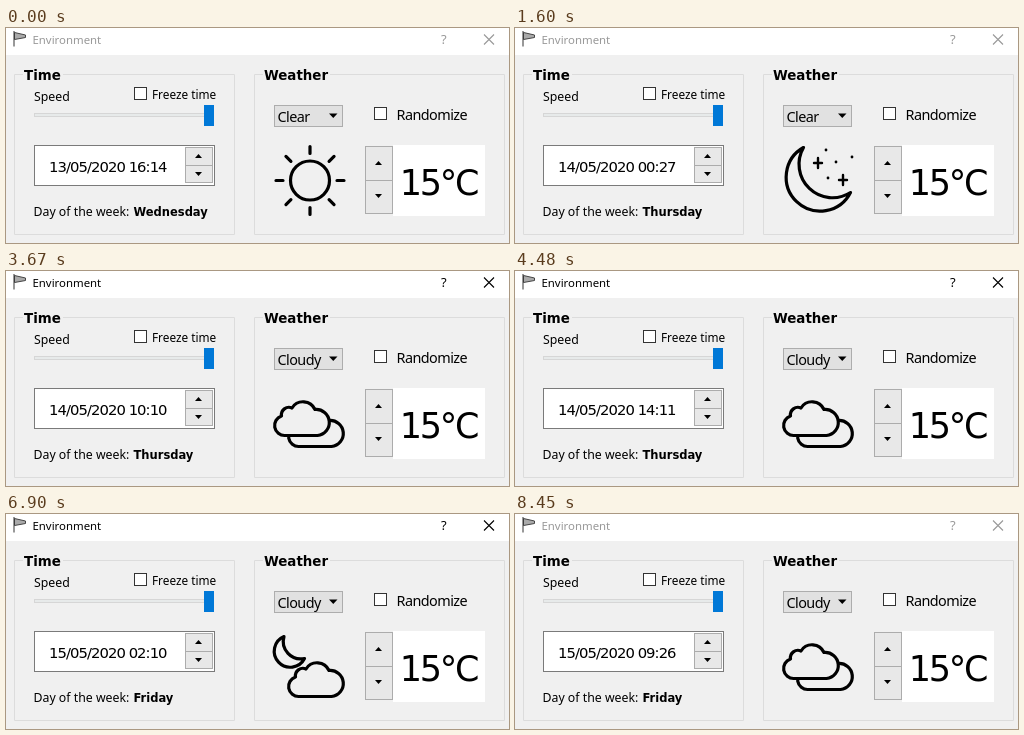
These frames come from a looping animation (503x215 px, 8480 ms). An HTML page:

```html
<!DOCTYPE html>
<html lang="en">
<head>
<meta charset="utf-8">
<title>Environment</title>
<style>
  html, body { margin: 0; width: 100%; height: 100%; overflow: hidden; background: #f0f0f0; }
  svg { display: block; width: 503px; height: 215px; }
  text { font: 12.3px "Noto Sans", "Open Sans", sans-serif; white-space: pre; }
  .bold { font: bold 13.4px "DejaVu Sans", sans-serif; }
  .mid { font-size: 14.4px; letter-spacing: -.55px; }
  .digits { font-family: "DejaVu Sans", sans-serif; }
  .line { fill: none; stroke: #000; stroke-width: 3.2; stroke-linecap: round; stroke-linejoin: round; }
  .group { fill: none; stroke: #dcdcdc; }
  .button { fill: #e8e8e8; stroke: #acacac; }
  .check { fill: #fff; stroke: #333; }
  #icons > g { display: none; }
  #icons > .on { display: inline; }
</style>
</head>
<body>
<svg viewBox="0 0 503 215">
  <defs>
    <path id="cloud" fill="#f0f0f0" d="M10 35.5A10 10 0 0 1 6.5 16A7.5 7.5 0 0 1 17 8A13 13 0 0 1 40 9.5A13 13 0 1 1 42.5 35.5Z"/>
    <path id="up" d="M-3.5 2L0-2L3.5 2Z"/>
    <path id="down" d="M-3.5-2L0 2L3.5-2Z"/>
  </defs>
  <rect width="503" height="215" fill="#f0f0f0"/>

  <!-- title bar -->
  <rect width="503" height="27" fill="#fff"/>
  <path d="M8.5 4.5L19.5 7V9.5L8.5 11.5Z" fill="#aaa" stroke="#444"/>
  <path d="M8 3V18.5" stroke="#333"/>
  <g id="bar">
    <text x="26.5" y="15.5" style="font-size:11.4px">Environment</text>
    <text x="435" y="16" style="font-size:13px">?</text>
    <path d="M478 6.5L488 16.5M488 6.5L478 16.5" stroke="currentColor" stroke-width="1.1"/>
  </g>

  <!-- time -->
  <path class="group" d="M17 46.5H8.5V206.5H228.5V46.5H57"/>
  <text class="bold" x="18" y="52">Time</text>
  <text x="28" y="73">Speed</text>
  <rect class="check" x="128.5" y="59.5" width="12" height="12"/>
  <text x="146" y="71" style="font-size:11.8px">Freeze time</text>
  <rect x="28.5" y="85.5" width="179" height="3" fill="#e7eaea" stroke="#d6d6d6"/>
  <rect x="198" y="77" width="10" height="21" fill="#0078d7"/>
  <rect x="28.5" y="117.5" width="180" height="40" fill="#fff" stroke="#7a7a7a"/>
  <rect class="button" x="179.5" y="119.5" width="27" height="18"/>
  <rect class="button" x="179.5" y="137.5" width="27" height="17"/>
  <use href="#up" x="192.5" y="128"/>
  <use href="#down" x="192.5" y="146"/>
  <text id="date" class="digits" x="43" y="144" style="font-size:14.8px;letter-spacing:-.94px"></text>
  <text x="27.5" y="188">Day of the week:</text>
  <text id="day" class="bold" x="127.5" y="188" style="font-size:11.5px"></text>

  <!-- weather -->
  <path class="group" d="M257 46.5H248.5V206.5H498.5V46.5H324"/>
  <text class="bold" x="258" y="52">Weather</text>
  <rect x="268.5" y="77.5" width="68" height="21" fill="#e1e1e1" stroke="#adadad"/>
  <text id="sky" class="mid" x="271.5" y="94"></text>
  <path d="M323 85.5H331.5L327.25 90Z"/>
  <rect class="check" x="368.5" y="79.5" width="12" height="12"/>
  <text class="mid" x="390.5" y="92">Randomize</text>
  <rect x="387" y="117" width="92" height="71" fill="#fff"/>
  <rect class="button" x="359.5" y="118.5" width="27" height="34"/>
  <rect class="button" x="359.5" y="152.5" width="27" height="33"/>
  <use href="#up" x="372.5" y="135"/>
  <use href="#down" x="372.5" y="168"/>
  <text class="digits" x="393.8" y="167" style="font-size:35px;letter-spacing:-2.3px">15°C</text>

  <g id="icons" class="line">
    <g id="ClearDay">
      <circle cx="304" cy="152.5" r="19.5"/>
      <path id="rays"/>
    </g>
    <g id="ClearNight">
      <path d="M288.5 119.5A34 34 0 1 0 335.5 164.5A33.5 33.5 0 0 1 288.5 119.5Z"/>
      <path stroke-width="2.4" d="M303 130V140M299 135H307M328 147V157M324 152H332"/>
      <path stroke-width="2.8" d="M311 122h.01M337 129h.01M321 134h.01M313 150h.01"/>
    </g>
    <g id="CloudyDay">
      <use href="#cloud" x="283" y="140"/>
      <use href="#cloud" x="269" y="129"/>
    </g>
    <g id="CloudyNight">
      <path d="M278 122.5A16 16 0 1 0 298.5 144.5A17.5 17.5 0 0 1 278 122.5Z"/>
      <use href="#cloud" x="283" y="147"/>
    </g>
  </g>
</svg>
<script>
const LOOP = 8480, STEP = 25.6;
const START = Date.UTC(2020, 4, 13, 16, 14);
const DAYS = ["Sunday", "Monday", "Tuesday", "Wednesday", "Thursday", "Friday", "Saturday"];
// [playback ms, simulated minutes]; flat parts are short stalls
const KEYS = [[0, 0], [1600, 493], [2840, 860], [3340, 1008], [3440, 1008], [4480, 1317],
  [5770, 1700], [6900, 2036], [8300, 2452], [8380, 2452], [8450, 2472], [LOOP, 2480]];
const $ = id => document.getElementById(id);
const pad = n => String(n).padStart(2, "0");

let rays = "";
for (let i = 0; i < 8; i++) {
  const c = Math.cos(i * Math.PI / 4), s = Math.sin(i * Math.PI / 4);
  rays += `M${304 + 27 * c} ${152.5 + 27 * s}L${304 + 34 * c} ${152.5 + 34 * s}`;
}
$("rays").setAttribute("d", rays);

function minutesAt(t) {
  const i = KEYS.findLastIndex(k => k[0] <= t);
  const [t0, m0] = KEYS[i], [t1, m1] = KEYS[i + 1];
  const held = Math.floor((t - t0) / STEP) * STEP;
  return Math.round(m0 + (m1 - m0) * held / (t1 - t0));
}

function draw(now) {
  const t = now % LOOP;
  const d = new Date(START + minutesAt(t) * 60000);
  const hour = d.getUTCHours();
  const sky = t < 3470 ? "Clear" : "Cloudy";
  const color = t >= 3470 && t < 8380 ? "#000" : "#999";
  const icon = sky + (hour >= 7 && hour < 19 ? "Day" : "Night");

  $("date").textContent = `${pad(d.getUTCDate())}/${pad(d.getUTCMonth() + 1)}/${d.getUTCFullYear()} ${pad(hour)}:${pad(d.getUTCMinutes())}`;
  $("day").textContent = DAYS[d.getUTCDay()];
  $("sky").textContent = sky;
  $("bar").style.color = $("bar").style.fill = color;
  for (const g of $("icons").children) g.classList.toggle("on", g.id === icon);
}

const begin = performance.now();
function tick() {
  draw(performance.now() - begin);
  requestAnimationFrame(tick);
}
tick();
</script>
</body>
</html>
```
